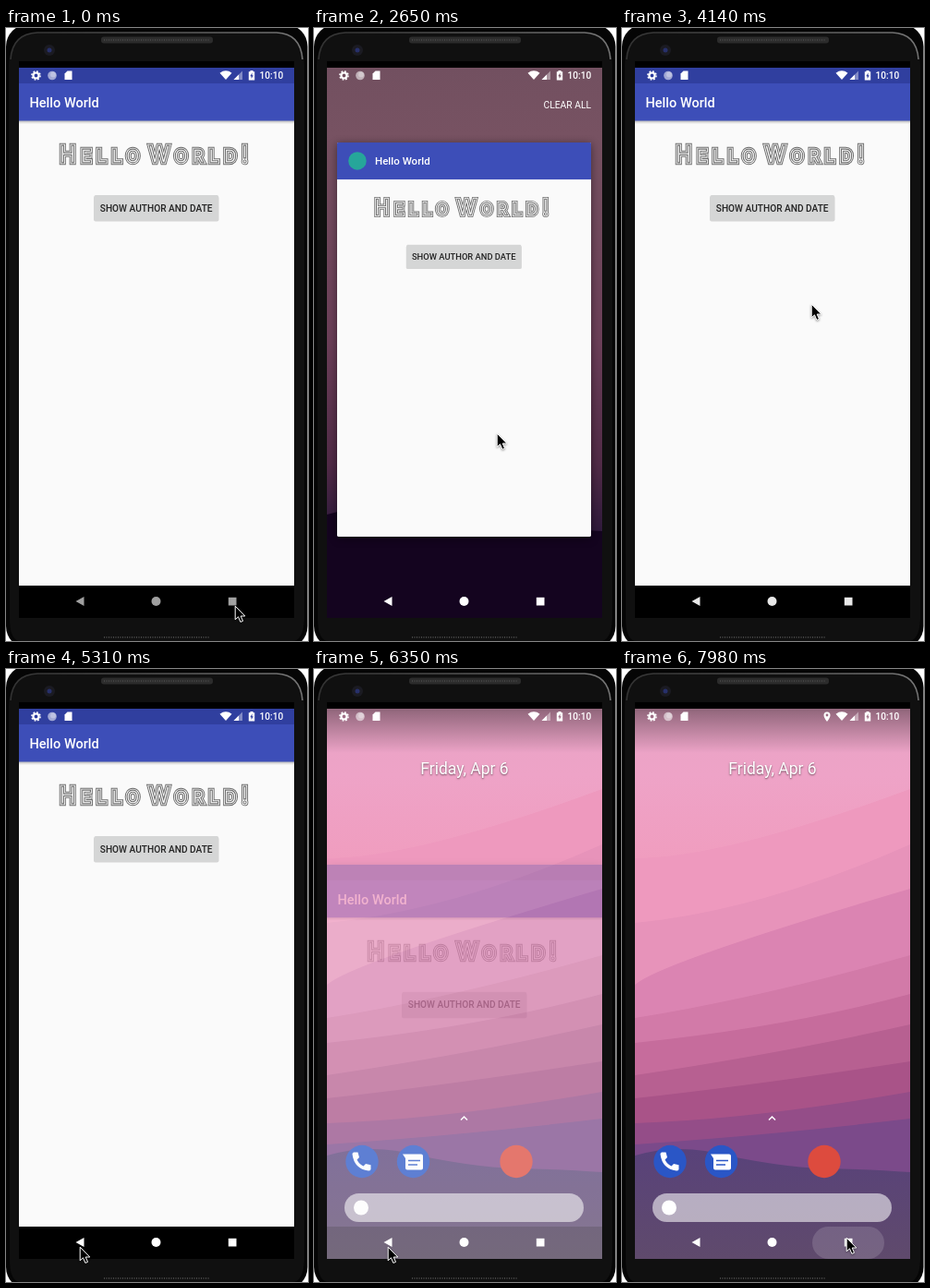
An HTML page for the animation above (8 s loop, 327 px wide and 664 px high).

```html
<!DOCTYPE html>
<html lang="en">
<head>
<meta charset="utf-8">
<title>Phone demo</title>
<style>
html, body { margin: 0; width: 100%; height: 100%; overflow: hidden; background: #fff; }
svg { display: block; width: 100%; height: 100%; }
text { font-family: Roboto, "Open Sans", sans-serif; }
.medium { font-weight: 500; }
.deco { font-family: Inter, Roboto, sans-serif; font-weight: 100; font-size: 17.5px; letter-spacing: 6.6px; }
.cap { font-size: 22.5px; }
#app { filter: drop-shadow(0 2px 5px #0007); }
#cursor { filter: drop-shadow(0 1px 1px #0006); }
</style>
</head>
<body>
<svg viewBox="0 0 327 664">
  <defs>
    <clipPath id="screen"><rect x="14" y="43" width="298" height="596"/></clipPath>
    <clipPath id="cardClip"><rect id="cardBox" x="14" y="43" width="298" height="561"/></clipPath>
    <linearGradient id="sky" x1="0" y1="0" x2="0" y2="1">
      <stop offset="0" stop-color="#e8a3c5"/><stop offset=".12" stop-color="#eea3c7"/>
      <stop offset=".35" stop-color="#f19abb"/><stop offset="1" stop-color="#e690b6"/>
    </linearGradient>
    <linearGradient id="hill" x1="0" y1="0" x2="0" y2="1">
      <stop offset="0" stop-color="#59427a"/><stop offset="1" stop-color="#5f4a6c"/>
    </linearGradient>
    <linearGradient id="scrim" x1="0" y1="0" x2="0" y2="1">
      <stop offset="0" stop-color="#000" stop-opacity=".38"/><stop offset="1" stop-color="#000" stop-opacity="0"/>
    </linearGradient>
    <linearGradient id="dusk" x1="0" y1="0" x2="0" y2="1">
      <stop offset="0" stop-color="#725060"/><stop offset=".12" stop-color="#775262"/>
      <stop offset=".5" stop-color="#6b3f58"/><stop offset=".72" stop-color="#512b47"/>
      <stop offset=".84" stop-color="#301a3c"/><stop offset="1" stop-color="#1a0a28"/>
    </linearGradient>
    <linearGradient id="rim">
      <stop offset="0" stop-color="#333"/><stop offset=".5" stop-color="#555"/><stop offset="1" stop-color="#777"/>
    </linearGradient>
    <linearGradient id="shade" x1="0" y1="0" x2="0" y2="1">
      <stop offset="0" stop-opacity=".28"/><stop offset="1" stop-opacity="0"/>
    </linearGradient>
    <g id="hello" class="deco">
      <text class="deco" x="58.5" y="145"><tspan class="cap">H</tspan>ELLO</text>
      <text class="deco" x="155.5" y="145"><tspan class="cap">W</tspan>ORLD<tspan class="cap">!</tspan></text>
    </g>
  </defs>

  <!-- phone body -->
  <rect x="0" y="-4" width="326.5" height="676" rx="24" fill="#050505"/>
  <path d="M3 40Q3 6 34 6H293Q323 6 323 40V640Q322 664 310 664H16Q4 664 4 640Z" fill="#101010"/>
  <path d="M5 34Q7 6 34 5H293Q319 6 321 34" fill="none" stroke="url(#rim)" stroke-width="1.5"/>
  <path d="M14 36V639H312V36" fill="#000"/>
  <rect x="103" y="9.5" width="121" height="7" rx="3" fill="#2c2c2c"/>
  <path d="M106 13H221M106 660H221" stroke="#444" stroke-width="2" stroke-dasharray="1 1.5"/>
  <circle cx="47" cy="24" r="6" fill="#1b1b22"/>
  <circle cx="47" cy="24" r="2.5" fill="#27306a"/>

  <g clip-path="url(#screen)">
    <g id="home">
      <rect x="14" y="43" width="298" height="596" fill="url(#sky)"/>
      <g id="bands"></g>
      <path d="M14 527Q50 516 90 522Q170 540 220 541T312 545V639H14Z" fill="url(#hill)"/>
      <rect x="14" y="43" width="298" height="48" fill="url(#scrim)"/>
      <text x="163" y="113.5" font-size="17.5" text-anchor="middle" fill="#fff" style="text-shadow:0 1px 2px #0008">Friday, Apr 6</text>
      <path d="M159 488.5L162.5 485L166 488.5" fill="none" stroke="#fff" stroke-width="1.5"/>
      <circle cx="52" cy="533.5" r="17.7" fill="#2a56c6"/>
      <path d="M43 523.5H47.5L49 529L46.5 531.5Q49 536.5 53.5 538.5L56 536L61.5 537.3V542Q61 543.5 59 543.5Q43.5 541.5 41.5 525.5Q41.5 524 43 523.5Z" fill="#fff"/>
      <circle cx="107.5" cy="533.5" r="17.7" fill="#2a56c6"/>
      <path d="M96 525.5H116Q118 525.5 118 527.5V540.5Q118 542.5 116 542.5H101Q99 542.5 99 540.5V530Z" fill="#fff"/>
      <path d="M102 532.5H115M102 537H112" stroke="#2a56c6" stroke-width="1.6"/>
      <circle cx="219" cy="533.5" r="17.7" fill="#dd4b3e"/>
      <rect x="33" y="568" width="259" height="31" rx="15.5" fill="#fff" opacity=".56"/>
      <circle cx="51" cy="583.5" r="8" fill="#fff"/>
    </g>

    <g id="overview">
      <rect x="14" y="43" width="298" height="596" fill="url(#dusk)"/>
      <path d="M14 527Q50 516 90 522Q170 540 220 541T312 545V639H14Z" fill="#14041f"/>
      <text id="clear" x="248.5" y="87" font-size="10.3" fill="#fff">CLEAR ALL</text>
    </g>

    <rect id="navBack" x="14" y="604" width="298" height="35"/>

    <g id="app"><g clip-path="url(#cardClip)">
      <rect x="14" y="43" width="298" height="561" fill="#fafafa"/>
      <rect x="14" y="100" width="298" height="4" fill="url(#shade)"/>
      <rect x="14" y="43" width="298" height="18" fill="#303f9f"/>
      <rect x="14" y="60" width="298" height="40.5" fill="#3d4eb8"/>
      <text id="barTitle" class="medium" x="25.5" y="86" font-size="14.5" fill="#fff">Hello World</text>
      <use href="#hello" stroke="#6e6e6e" fill="#6e6e6e" stroke-width="6.6"/>
      <use href="#hello" stroke="#fafafa" fill="#fafafa" stroke-width="4.7"/>
      <use href="#hello" stroke="#6e6e6e" fill="#6e6e6e" stroke-width="2.9"/>
      <use href="#hello" stroke="#fafafa" fill="#fafafa" stroke-width=".7"/>
      <rect x="95" y="182" width="135.5" height="27.5" rx="2" opacity=".15"/>
      <rect x="95.5" y="181" width="134.5" height="27.5" rx="1.5" fill="#d5d6d6"/>
      <text class="medium" x="162.7" y="198.6" font-size="10.15" text-anchor="middle" fill="#222">SHOW AUTHOR AND DATE</text>
      <g id="cardHead">
        <rect x="14" y="61" width="298" height="43.4" fill="#3d4eb8"/>
        <circle cx="37.8" cy="82.6" r="10.6" fill="#26a69a"/>
        <text class="medium" x="58.4" y="87.3" font-size="12.5" fill="#fff">Hello World</text>
      </g>
    </g></g>

    <!-- status bar -->
    <g fill="#fff">
      <circle cx="32.5" cy="51.5" r="3" fill="none" stroke="#fff" stroke-width="2.2"/>
      <circle cx="32.5" cy="51.5" r="4.6" fill="none" stroke="#fff" stroke-width="1.5" stroke-dasharray="1.8 1.81"/>
      <circle cx="50" cy="51.5" r="4.8" opacity=".55"/>
      <circle cx="51" cy="50.5" r="3" opacity=".3"/>
      <path d="M63.5 49.5L66.5 46.5H71.5V56H63.5Z"/>
      <path id="pin" d="M222 57Q218.5 52.5 218.5 50A3.5 3.5 0 0 1 225.5 50Q225.5 52.5 222 57ZM222 48.6A1.4 1.4 0 1 0 222 51.4A1.4 1.4 0 1 0 222 48.6Z" fill-rule="evenodd"/>
      <path d="M231.5 48.7Q238 44 244.5 48.7L238 56Z"/>
      <path d="M246.5 56L256 46.5V56Z" opacity=".4"/>
      <path d="M246.5 56L252 50.5V56Z"/>
      <path d="M262.8 47.3H264.5V46H267.5V47.3H269.2V56.5H262.8ZM266.5 48.5L264.3 52.3H265.6V55L267.8 51.2H266.5Z" fill-rule="evenodd"/>
      <text class="medium" x="274.6" y="55.2" font-size="10.1">10:10</text>
    </g>

    <!-- navigation bar -->
    <rect id="ripple" y="604" width="78" height="35" rx="17.5" fill="#fff"/>
    <g id="nav">
      <path d="M75.5 621L84.5 616V626Z"/>
      <circle cx="162.5" cy="621" r="5"/>
      <rect x="240.8" y="616.8" width="8.7" height="8.7"/>
    </g>
  </g>
  <path id="cursor" d="M.2 .2V14.8L3.5 11.8L5.9 17.4L8.5 16.3L6.2 11H10.8Z" fill="#000" stroke="#fff"/>
</svg>
<script>
const LOOP = 8000, STEP = 147.7;
const $ = id => document.getElementById(id);
const set = (id, attrs) => {
  for (const name in attrs) $(id).setAttribute(name, attrs[name]);
};

// left height, bend x, bend y, right height, colour
const bands = [
  [205, 110, 205, 130, "#ee99be"],
  [275, 150, 262, 190, "#e793ba"],
  [342, 40, 318, 238, "#db84b2"],
  [378, 150, 356, 310, "#d27aa8"],
  [405, 180, 388, 352, "#c66c9c"],
  [440, 180, 415, 385, "#b76091"],
  [465, 150, 450, 425, "#a95388"],
  [492, 140, 488, 458, "#944d88"],
  [515, 160, 505, 487, "#7b4a8a"]
];
$("bands").innerHTML = bands.map(([a, x, y, b, fill]) =>
  `<path d="M14 ${a}Q${x} ${y} 312 ${b}V639H14Z" fill="${fill}"/>`).join("");

// keys are [step, value, ...]
const pointer = [[0, 248, 626], [1, 242, 625], [17, 242, 625], [18, 198, 439], [21, 198, 439],
  [23, 205, 299], [30, 205, 299], [34, 84, 640], [35, 84, 640], [36, 80, 626], [47, 80, 626],
  [53, 243, 616]];
const shrink = [[12, 0], [13, .025], [14, .45], [15, .9], [16, 1], [23, 1], [24, .9], [25, .55],
  [26, .2], [27, .04], [28, 0]];
const leave = [[41, 0], [42, .25], [43, .75], [44, 1]];
const press = [[7, 0], [8, .6], [9, 1], [10, 0], [37, 0], [38, .6], [39, 1], [40, 0],
  [52, 0], [54, 1]];
const glow = [[7, 160], [8, 220], [9, 255], [27, 255], [28, 232], [30, 160], [35, 160], [36, 255]];

function track(keys, k) {
  const next = keys.findIndex(key => key[0] > k);
  if (next === 0) return keys[0].slice(1);
  if (next < 0) return keys[keys.length - 1].slice(1);
  const a = keys[next - 1], b = keys[next];
  const f = (k - a[0]) / (b[0] - a[0]);
  return a.slice(1).map((v, i) => v + (b[i + 1] - v) * f);
}

function draw(now) {
  const k = Math.floor((now % LOOP + 9) / STEP);
  const [p] = track(shrink, k), [gone] = track(leave, k);
  const [hit] = track(press, k), [g] = track(glow, k), [x, y] = track(pointer, k);

  set("home", { visibility: gone > 0 ? "visible" : "hidden" });
  set("overview", { visibility: p > 0 ? "visible" : "hidden" });
  set("clear", { opacity: Math.max(0, p * 2 - 1) });
  set("navBack", { opacity: (1 - p) * (1 - gone) });
  set("app", {
    opacity: 1 - gone,
    transform: `translate(${14 + 11 * p} ${43 + 64.4 * p + 225 * gone}) scale(${1 - .077 * p}) translate(-14 -43)`
  });
  set("cardBox", { y: 43 + 18 * p, height: 561 - 98.4 * p * p, rx: 2 * p });
  set("cardHead", { opacity: p });
  set("barTitle", { opacity: 1 - p });
  set("pin", { visibility: k >= 46 ? "visible" : "hidden" });
  set("ripple", { x: k > 30 && k < 45 ? 41 : 206, opacity: .14 * hit });
  set("nav", { fill: `rgb(${g},${g},${g})` });
  set("cursor", { transform: `translate(${x} ${y})` });
  requestAnimationFrame(draw);
}
requestAnimationFrame(draw);
</script>
</body>
</html>
```
